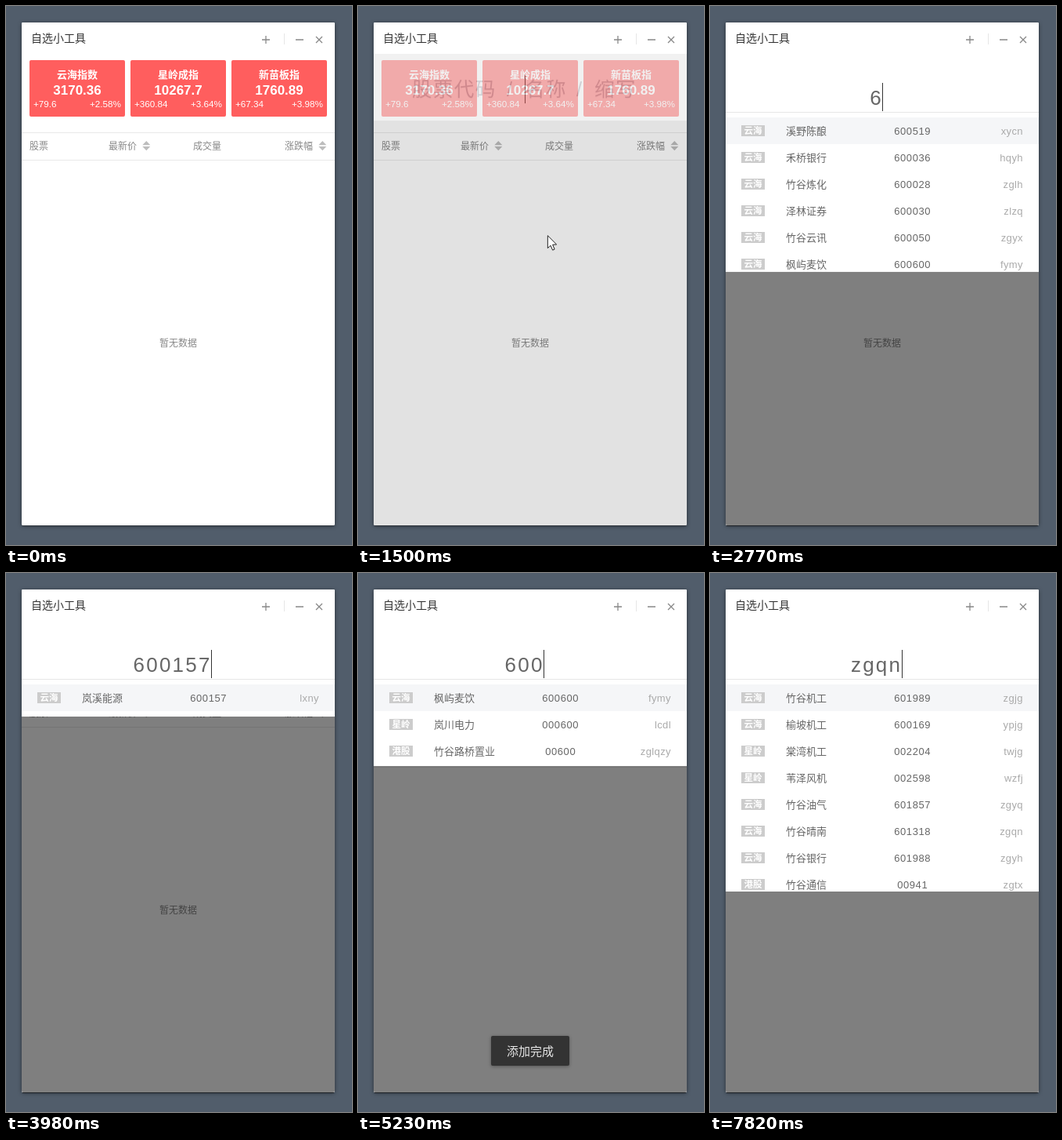
An HTML page with a canvas for the animation above (8000 ms loop, 442 px wide and 687 px high).

```html
<!DOCTYPE html>
<html lang="zh">
<head>
<meta charset="utf-8">
<title>自选小工具</title>
<style>
html, body { margin: 0; width: 100%; height: 100%; overflow: hidden; background: #515d6b; }
canvas { display: block; }
</style>
</head>
<body>
<canvas id="stage" width="442" height="687"></canvas>
<script>
const LOOP = 8000;
const FONT = '"Liberation Sans", "Noto Sans CJK SC", "Noto Sans CJK", "Noto Sans CJK JP", sans-serif';
const RED = '#ff5e5e';
const stage = document.getElementById('stage');
const layer = document.createElement('canvas');
layer.width = 442;
layer.height = 687;
const main = stage.getContext('2d');
const sheet = layer.getContext('2d');
let g = main;

const clamp = v => Math.max(0, Math.min(1, v));
const outCubic = v => 1 - (1 - clamp(v)) ** 3;
const outQuint = v => 1 - (1 - clamp(v)) ** 5;

// Market tag, name, code, initials
const A = '云海', B = '星岭', H = '港股';
const added = [[A, '岚溪能源', '600157', 'lxny']];
const list600 = [
  [A, '枫屿麦饮', '600600', 'fymy'],
  [B, '岚川电力', '000600', 'lcdl'],
  [H, '竹谷路桥置业', '00600', 'zglqzy'],
  [A, '溪野陈酿', '600519', 'xycn'],
  [A, '禾桥银行', '600036', 'hqyh'],
  [A, '竹谷炼化', '600028', 'zglh'],
  [A, '泽林证券', '600030', 'zlzq'],
  [A, '竹谷云讯', '600050', 'zgyx']
];
const listZg = [
  [A, '竹谷机工', '601989', 'zgjg'],
  [A, '榆坡机工', '600169', 'ypjg'],
  [B, '棠湾机工', '002204', 'twjg'],
  [B, '苇泽风机', '002598', 'wzfj'],
  [A, '竹谷油气', '601857', 'zgyq'],
  [A, '竹谷晴南', '601318', 'zgqn'],
  [A, '竹谷银行', '601988', 'zgyh'],
  [H, '竹谷通信', '00941', 'zgtx']
];
const rotate = (list, n) => [...list.slice(n), ...list.slice(0, n)];
const list6 = rotate(list600, 3);
const list60 = rotate(list600, 5);
const listZ = [...list600, ...listZg].filter(r => r[3][0] === 'z').slice(0, 8);

const indices = [
  ['云海指数', '3170.36', '+79.6', '+2.58%'],
  ['星岭成指', '10267.7', '+360.84', '+3.64%'],
  ['新苗板指', '1760.89', '+67.34', '+3.98%']
];

const typed = [
  [0, ''], [2364, '6'], [3190, '60'], [3550, '600'], [3980, '600157'],
  [5200, '6001'], [5230, '600'], [5610, '60'], [5900, '6'], [5960, ''],
  [6230, 'z'], [7220, 'zg'], [7650, 'zgq'], [7820, 'zgqn']
];
const results = [
  [0, []], [2700, list6], [3220, list60], [3680, list600], [3980, added],
  [5210, list600], [6530, listZ], [7520, listZg]
];
const toggles = [[-1000, 0], [782, 1], [1450, 0], [2364, 1], [4247, 0], [4787, 1]];
const pointer = [
  [70, 300, 684], [640, 331, 36], [780, 329, 40], [940, 325, 51], [1010, 322, 58],
  [1430, 244, 290], [1680, 233, 301], [1710, 215, 318], [2110, 215, 318],
  [2140, 300, 292], [2170, 428, 251], [2199, 428, 251]
];
const at = (track, t) => track.filter(k => k[0] <= t).pop();

function text(str, x, cy, size, color, { align = 'left', weight = 400, space = 0 } = {}) {
  g.font = `${weight} ${size}px ${FONT}`;
  g.letterSpacing = space + 'px';
  g.textAlign = align;
  g.fillStyle = color;
  g.fillText(str, x, cy + size * 0.37);
}

function rect(x, y, w, h, color) {
  g.fillStyle = color;
  g.fillRect(x, y, w, h);
}

function round(x, y, w, h, r, color) {
  g.fillStyle = color;
  g.beginPath();
  g.roundRect(x, y, w, h, r);
  g.fill();
}

function poly(points, color) {
  g.beginPath();
  points.forEach(([x, y]) => g.lineTo(x, y));
  g.closePath();
  g.fillStyle = color;
  g.fill();
}

function sorter(x) {
  poly([[x - 5, 177.3], [x, 172], [x + 5, 177.3]], '#bdbdbd');
  poly([[x - 5, 179], [x, 184.3], [x + 5, 179]], '#bdbdbd');
}

function page(t) {
  rect(20, 21, 400, 641, '#fff');
  indices.forEach(([name, value, diff, pct], i) => {
    const x = 30 + 129 * i;
    round(x, 69, 122, 72, 2, RED);
    text(name, x + 61, 87, 13, '#fff', { align: 'center', weight: 700 });
    text(value, x + 61, 106.3, 17, '#fff', { align: 'center', weight: 700 });
    text(diff, x + 5, 125, 11.7, '#fff');
    text(pct, x + 117, 125, 11.7, '#fff', { align: 'right' });
  });
  rect(20, 161, 400, 1, '#e9e9e9');
  rect(20, 196, 400, 1, '#e9e9e9');
  const heads = [['股票', 30], ['最新价', 131], ['成交量', 239], ['涨跌幅', 356]];
  heads.forEach(([s, x]) => text(s, x, 179, 12, '#888', { weight: 500 }));
  sorter(179.3);
  sorter(404.3);
  if (t < 4247) {
    text('暂无数据', 220, 430, 12, '#888', { align: 'center' });
    return;
  }
  text(added[0][1], 30, 216, 14, '#333', { weight: 500 });
  text('SH600157', 30, 233, 11.5, '#999');
  text('2.27', 185, 222, 12.5, '#555', { align: 'right', weight: 500 });
  text('338.83万手', 275, 222, 12.5, '#555', { align: 'right', weight: 500 });
  text('+0.09', 341, 222, 12.6, RED, { align: 'right' });
  round(345, 210, 65, 23, 2, RED);
  text('+4.13%', 405, 222, 12.6, '#fff', { align: 'right', weight: 700 });
  rect(20, 247, 400, 1, '#e9e9e9');
}

function panelHeight(t) {
  const bottom = list => list.length ? Math.min(406, 148 + 34 * list.length) + (list.length === 1) * 1 : 156;
  const i = results.findIndex(k => k === at(results, t));
  const to = bottom(results[i][1]);
  const from = i ? bottom(results[i - 1][1]) : to;
  // Growing is eased, shrinking is immediate
  return to > from ? from + (to - from) * outCubic((t - results[i][0]) / 200) : to;
}

function query(t) {
  const str = at(typed, t)[1];
  let caret = 213;
  if (str) {
    const space = 2.2;
    g.font = `400 26px ${FONT}`;
    g.letterSpacing = space + 'px';
    const w = g.measureText(str).width;
    text(str, 212.6 - w / 2, 116.5, 26, '#666', { space });
    caret = Math.round(212.4 + w / 2 - 0.4);
  } else {
    [['股票代码', 69], ['/', 190], ['名称', 213], ['/', 279], ['缩写', 302]].forEach(([s, x]) =>
      text(s, x, 116, 25.5, '#bdbdc5', { space: 1.4 }));
  }
  if (t < 6560 || t >= 6920) rect(caret, 98, 1, 36, '#333');
}

function panel(t) {
  const bottom = panelHeight(t);
  const list = at(results, t)[1];
  g.save();
  g.beginPath();
  g.rect(20, 41, 400, bottom - 41);
  g.clip();
  rect(20, 61, 400, bottom - 61, '#fff');
  query(t);
  if (list.length) {
    rect(20, 135, 400, 1, '#e6e6e6');
    rect(20, 142, 400, 34, '#f5f6f8');
  }
  list.forEach(([tag, name, code, initials], i) => {
    const y = 159 + 34 * i;
    rect(40, y - 7, 30, 14, '#ccc');
    text(tag, 55, y, 11.5, '#fff', { align: 'center', weight: 700 });
    text(name, 97, y + 0.5, 13, '#666');
    text(code, 258.7, y + 0.5, 13, '#666', { align: 'center', space: 0.6 });
    text(initials, 400, y + 0.5, 13, '#aaa', { align: 'right', space: 0.4 });
  });
  g.restore();
}

function header() {
  rect(20, 21, 400, 40, '#fff');
  text('自选小工具', 32, 41, 14, '#333');
  rect(355, 35, 1, 14, '#e6e6e6');
  g.strokeStyle = '#888';
  g.lineWidth = 1.3;
  g.beginPath();
  [[327, 43, 337, 43], [332, 38, 332, 48], [370, 43, 380, 43],
   [396, 39, 404, 47], [404, 39, 396, 47]].forEach(([x1, y1, x2, y2]) => {
    g.moveTo(x1, y1);
    g.lineTo(x2, y2);
  });
  g.stroke();
}

function toast(t) {
  const a = outCubic((t - 4247) / 220) * (1 - clamp((t - 5595) / 110));
  if (a <= 0) return;
  g.save();
  g.globalAlpha = a;
  g.shadowColor = 'rgba(0,0,0,.35)';
  g.shadowBlur = 4;
  g.shadowOffsetY = 1;
  round(170, 590, 100, 38, 2, '#333');
  g.shadowColor = 'transparent';
  text('添加完成', 220, 609, 15, '#e6e6e6', { align: 'center' });
  g.restore();
}

function cursor(t) {
  const i = pointer.findIndex(k => k[0] > t);
  if (i < 1) return;
  const [t0, x0, y0] = pointer[i - 1], [t1, x1, y1] = pointer[i];
  const v = (t - t0) / (t1 - t0), k = v * v * (3 - 2 * v);
  g.save();
  g.translate(x0 + (x1 - x0) * k + 0.5, y0 + (y1 - y0) * k + 0.5);
  poly([[0, 0], [0, 16], [3.7, 12.6], [6.3, 18.5], [8.8, 17.4], [6.3, 11.6], [11.3, 11.3]], '#fff');
  g.strokeStyle = '#222';
  g.lineWidth = 1;
  g.stroke();
  g.restore();
}

function draw(t) {
  const [since, open] = at(toggles, t);
  const dim = Math.abs(1 - open - outQuint((t - since) / 200));
  const show = Math.abs(1 - open - outCubic((t - since) / 250));

  rect(0, 0, 442, 687, '#515d6b');
  g.save();
  g.shadowColor = 'rgba(0,0,0,.5)';
  g.shadowBlur = 5;
  g.shadowOffsetY = 1;
  round(20, 21, 400, 641, 2, '#fff');
  g.restore();
  rect(21, 662, 398, 1, `rgba(0,0,0,${0.2 + 0.3 * dim})`);

  g.save();
  g.beginPath();
  g.roundRect(20, 21, 400, 641, 2);
  g.clip();
  page(t);
  rect(20, 61, 400, 601, `rgba(0,0,0,${0.5 * dim})`);
  if (show > 0.001) {
    g = sheet;
    g.clearRect(0, 0, 442, 687);
    panel(t);
    g = main;
    g.globalAlpha = show;
    g.drawImage(layer, 0, -20 * (1 - show));
    g.globalAlpha = 1;
  }
  header();
  toast(t);
  g.restore();
  cursor(t);
}

const start = performance.now();
function tick() {
  draw((performance.now() - start) % LOOP);
  requestAnimationFrame(tick);
}
tick();
</script>
</body>
</html>
```
